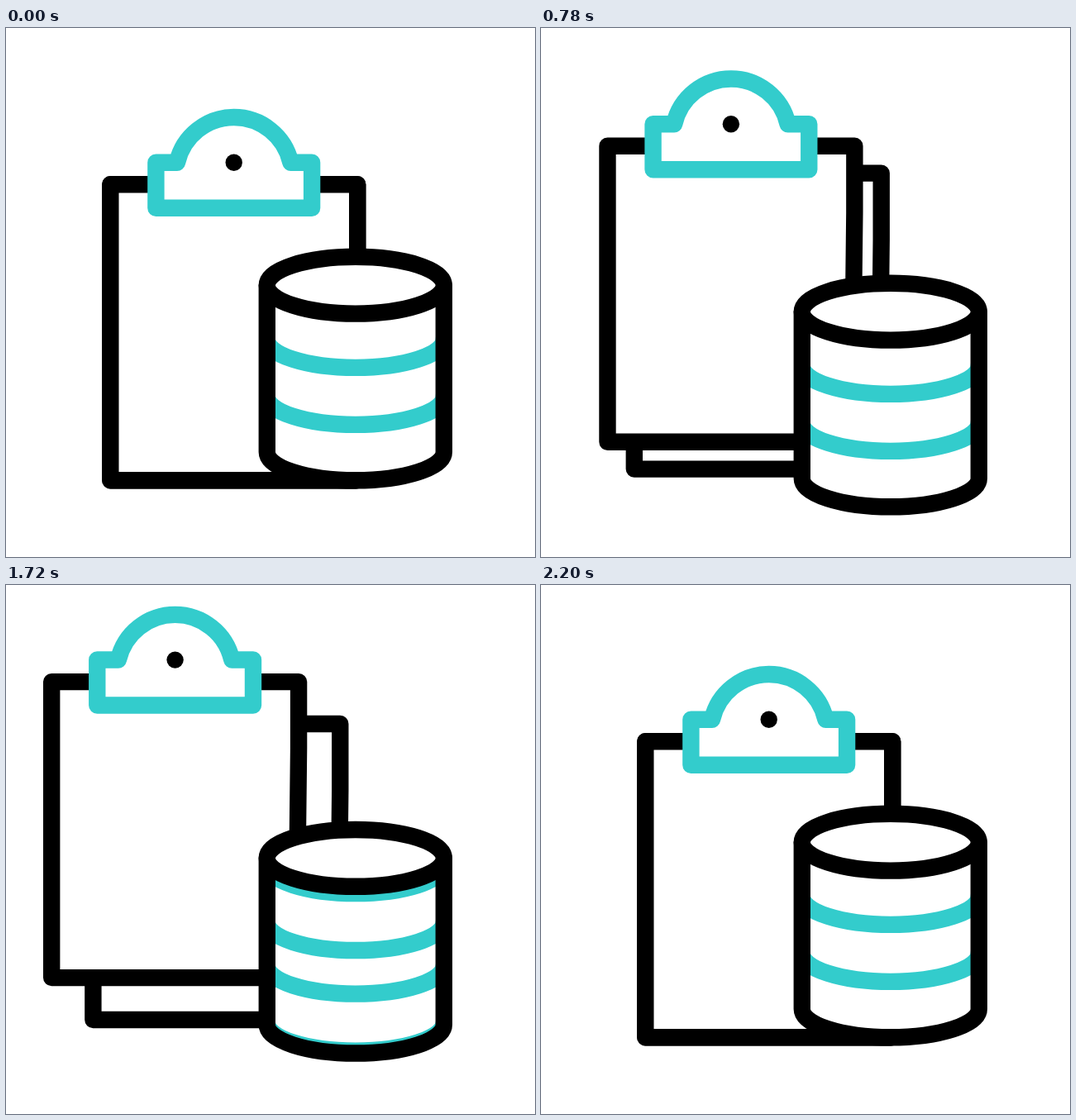
An HTML page for the animation above (2.42 s loop, 640 by 640 pixels).

```html
<!DOCTYPE html>
<html lang="en">
<head>
<meta charset="utf-8">
<title>Clipboard and database</title>
<style>
  html, body { margin: 0; width: 100%; height: 100%; overflow: hidden; background: #fff; }
  svg { display: block; width: 100%; height: 100%; }
  .line { fill: #fff; stroke: #000; stroke-width: 20.4; stroke-linejoin: round; stroke-linecap: round; }
  .teal { stroke: #3cc; }
  .open { fill: none; }
</style>
</head>
<body>
<svg viewBox="0 0 640 640">
  <defs>
    <path id="board" class="line" d="M126.3 189.3H425.2V270L423.4 430V547.3H126.3Z"/>
    <path id="wall" d="M315.8 311.2V512.9A107 34.4 0 0 0 529.8 512.9V311.2"/>
    <g id="bands" class="line teal open">
      <path d="M315.8 376.5A107 34.4 0 0 0 529.8 376.5"/>
      <path d="M315.8 445.5A107 34.4 0 0 0 529.8 445.5"/>
    </g>
    <clipPath id="inside"><use href="#wall"/></clipPath>
  </defs>
  <use id="back" href="#board"/>
  <g id="front">
    <use href="#board"/>
    <path class="line teal" d="M181.4 162.7H207A70.5 70.5 0 0 1 344.4 162.7H370.1V217.7H181.4Z"/>
    <circle cx="275.7" cy="162.8" r="10.2"/>
  </g>
  <g id="drum">
    <use href="#wall" fill="#fff"/>
    <g clip-path="url(#inside)">
      <use id="oldBands" href="#bands"/>
      <use id="newBands" href="#bands"/>
    </g>
    <use href="#wall" class="line open"/>
    <ellipse class="line" cx="422.8" cy="311.2" rx="107" ry="34.4"/>
  </g>
</svg>
<script>
const LOOP = 2420, STEP = 20;
const FRONT = [-87, -88.3], BACK = [-25.6, -26], DROP = 38.6;
const OPEN = 200, OPENED = 1320, CLOSE = 1540, CLOSED = 2200;

const el = id => document.getElementById(id);
const part = (t, from, to) => Math.min(1, Math.max(0, (t - from) / (to - from)));
const smooth = u => u * u * (3 - 2 * u);
const move = (id, x, y) => el(id).setAttribute('transform', `translate(${x} ${y})`);

function draw(t) {
  const out = part(t, OPEN, OPENED), home = part(t, CLOSE, CLOSED);
  const spread = smooth(out) - smooth(home);
  move('front', FRONT[0] * spread, FRONT[1] * spread);
  move('back', BACK[0] * spread, BACK[1] * spread);

  const sink = t < CLOSE
    ? 1 - (1 - out) ** 2.42
    : (1 - home) ** 2 * (1 - 0.8 * home * home);
  move('drum', 0, DROP * sink);

  // Old bands drop out of the drum; new ones fall in, overshoot and settle.
  move('oldBands', 0, 140 * smooth(part(t, CLOSE, 1920)));
  el('oldBands').style.display = t < 1920 ? '' : 'none';
  move('newBands', 0, -138 + 166 * smooth(part(t, CLOSE, 1906)) - 28 * smooth(part(t, 1906, CLOSED)));
}

const start = performance.now();
function tick() {
  const t = (performance.now() - start) % LOOP;
  draw(Math.floor(t / STEP) * STEP);
  requestAnimationFrame(tick);
}
tick();
</script>
</body>
</html>
```
